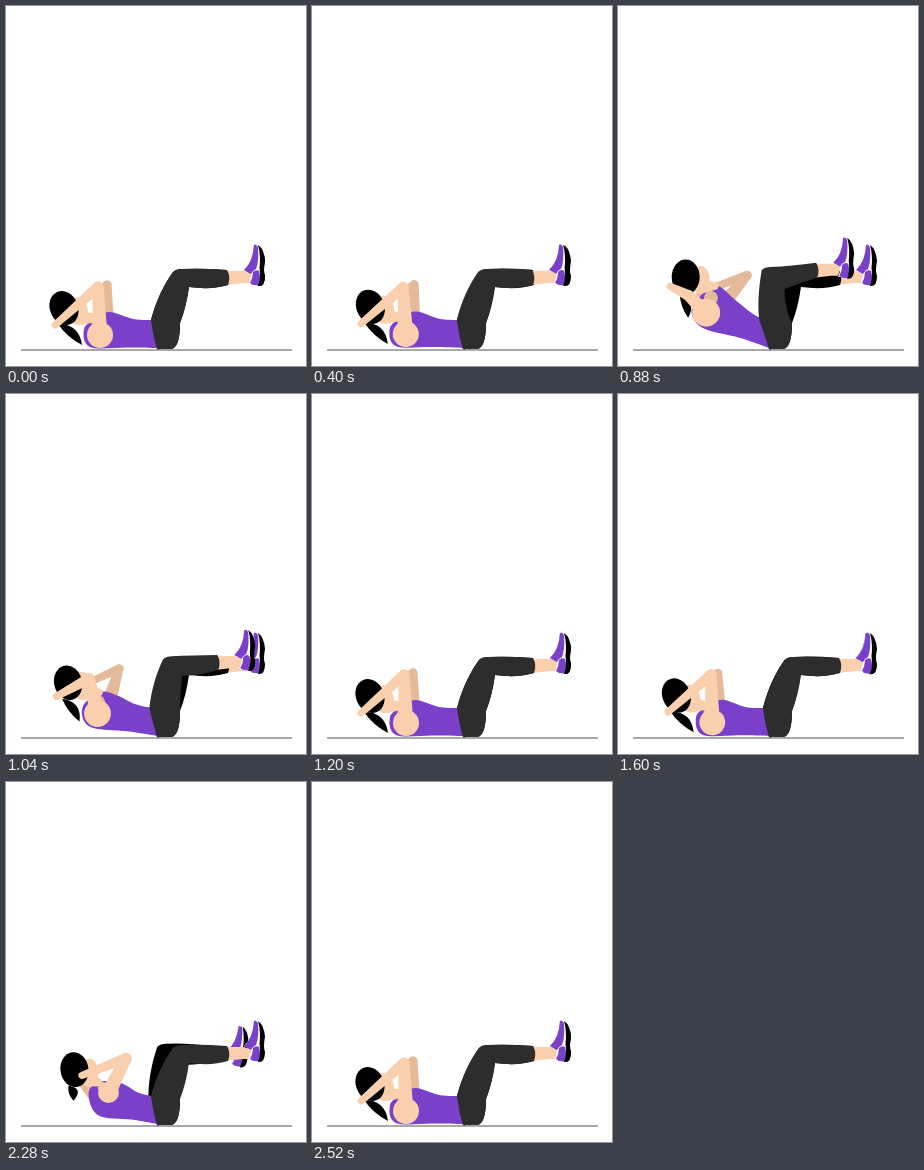
Recreate the animation shown at these times as an HTML page with a canvas. Size 300 by 360 pixels, loop 2.56 s.

```html
<!DOCTYPE html>
<html lang="en">
<head>
<meta charset="utf-8">
<title>Bicycle crunch</title>
<style>
html, body { margin: 0; width: 100%; height: 100%; overflow: hidden; background: #fff; }
canvas { display: block; width: 300px; height: 360px; }
</style>
</head>
<body>
<canvas id="stage"></canvas>
<script>
const W = 300, H = 360, LOOP = 2560, STEP = 40;
const SKIN = '#f9cfae', SHADE = '#e4ba9b', PURPLE = '#7b40c9', DARK = '#2d2d2d', BLACK = '#000';
const canvas = document.getElementById('stage');
const ctx = canvas.getContext('2d');
const dpr = window.devicePixelRatio || 1;
canvas.width = W * dpr;
canvas.height = H * dpr;

// Joints lying flat and at the top of each twist; shape is [shoulder radius, head tilt].
const poses = {
  rest: {
    head: [58, 302], tail: [76, 339], neck: [90, 312], bust: [104, 306], back: [78, 323], low: [84, 341],
    hand: [49, 319], elbow: [92, 281], shoulder: [94, 329],
    farHand: [92, 286], farElbow: [101, 279], farShoulder: [101, 308], shape: [13, -0.4]
  },
  left: {
    head: [68, 270], tail: [70, 311], neck: [97, 279], bust: [117, 293], back: [74, 301], low: [84, 321],
    hand: [52, 279], elbow: [70, 290], shoulder: [88, 306],
    farHand: [81, 287], farElbow: [130, 269], farShoulder: [111, 291], shape: [14, 0]
  },
  right: {
    head: [74, 280], tail: [63, 308], neck: [93, 294], bust: [119, 298], back: [85, 306], low: [96, 329],
    hand: [90, 280], elbow: [135, 274], shoulder: [107, 301],
    farHand: [66, 284], farElbow: [50, 294], farShoulder: [87, 323], shape: [9, 0]
  }
};
const hip = [151, 342], waist = [146, 314];

const shoe = [
  ['#fff', 'M248 239Q253 237 256 245L255 279L243 278Q246 270 245 267L238 264Q247 256 248 239Z'],
  [PURPLE, 'M248 239Q251 238 252 242Q253 256 250 263Q246 265 245 268L238 264Q247 256 248 239Z'],
  [PURPLE, 'M247 266Q250 263 253 265Q255 272 253 279Q247 280 244 277Q247 272 247 266Z'],
  [BLACK, 'M252 239Q258 243 259 255Q257 265 259 270Q259 281 252 280Q255 272 253.5 262Q255 250 252 239Z']
].map(([color, path]) => [color, new Path2D(path)]);
const ankle = new Path2D('M219 265L238 265L245 268L243 277L236 277L219 279Z');

const mix = (a, b, k) => a.map((v, i) => v + (b[i] - v) * k);
const add = (p, x, y) => [p[0] + x, p[1] + y];
const ease = u => (1 - Math.cos(Math.PI * u)) / 2;

function fill(color, path) {
  ctx.fillStyle = color;
  path ? ctx.fill(path) : ctx.fill();
}

function oval([x, y], rx, ry, tilt, color) {
  ctx.beginPath();
  ctx.ellipse(x, y, rx, ry, tilt, 0, 7);
  fill(color);
}

const disc = (p, r, color) => oval(p, r, r, 0, color);

// Tapered limb with round ends.
function limb(a, b, ra, rb, color) {
  const dir = Math.atan2(b[1] - a[1], b[0] - a[0]);
  const side = Math.acos((ra - rb) / Math.max(Math.hypot(b[0] - a[0], b[1] - a[1]), Math.abs(ra - rb)));
  ctx.beginPath();
  ctx.arc(a[0], a[1], ra, dir + side, dir - side + Math.PI * 2);
  ctx.arc(b[0], b[1], rb, dir - side, dir + side);
  fill(color);
}

// Closed smooth curve; a repeated point makes a corner.
function blob(points, color) {
  const n = points.length, at = i => points[(i + n) % n];
  ctx.beginPath();
  ctx.moveTo(...points[0]);
  for (let i = 0; i < n; i++) {
    const [a, b, c, d] = [at(i - 1), at(i), at(i + 1), at(i + 2)];
    ctx.bezierCurveTo(b[0] + (c[0] - a[0]) / 6, b[1] + (c[1] - a[1]) / 6,
      c[0] - (d[0] - b[0]) / 6, c[1] - (d[1] - b[1]) / 6, ...c);
  }
  fill(color);
}

// A raised foot slides back by dx and shifts by dy; the knee bends with it.
function drawLeg(s, color, lift, turn) {
  const dx = -23.5 * s, dy = lift * s, rise = Math.min(dy, 0);
  const [kx, ky] = [170 - 24 * s, 264 - 2 * s];
  const wx = 145 - 4 * s, bend = kx - wx;
  const ax = 222 + dx, ay = 264 + rise;
  ctx.save();
  ctx.translate(dx, rise);
  fill(SKIN, ankle);
  ctx.restore();

  ctx.beginPath();
  ctx.moveTo(151, 343);
  ctx.quadraticCurveTo(147, 330, wx, 314);
  ctx.bezierCurveTo(wx + bend * 0.37 - 4, 294, kx - 3 - bend * 0.35, ky + 14, kx - 3, ky + 2);
  ctx.quadraticCurveTo(kx, ky - 1, kx + 6, ky - 1);
  ctx.quadraticCurveTo((kx + ax) / 2, ky - 2, ax - 1, ay);
  ctx.quadraticCurveTo(ax + 3, ay + 7, ax, ay + 15);
  ctx.quadraticCurveTo(ax - 16, ay + 20, kx + 13 + 7 * s, 281 + 2 * s);
  ctx.quadraticCurveTo(kx + 10 + 10 * s, 302, 174, 317);
  ctx.quadraticCurveTo(174, 342, 165, 343);
  fill(color);

  ctx.save();
  ctx.translate(249 + dx, 239 + dy);
  ctx.rotate(turn * s);
  ctx.translate(-249, -239);
  for (const [tone, path] of shoe) fill(tone, path);
  ctx.restore();
}

function drawTorso(p) {
  const belly = add(mix(p.bust, waist, 0.5), 2, 3);
  const seat = add(mix(p.low, hip, 0.5), 4, 0);
  blob([hip, hip, waist, waist, belly, p.bust, p.neck, p.back, p.low, seat], PURPLE);
}

function drawHead(p, tilt) {
  limb(add(p.head, 14, 10), p.neck, 7, 4, SKIN);
  oval(add(p.head, 15, 3), 9, 14, tilt / 2, SKIN);
  oval(p.head, 14, 17.5, tilt, BLACK);
  const root = add(p.head, -6, 16), [tx, ty] = p.tail;
  const vx = tx - root[0], vy = ty - root[1], len = Math.hypot(vx, vy);
  const control = off => add(mix(root, p.tail, 0.5), vy / len * off, -vx / len * off);
  ctx.beginPath();
  ctx.moveTo(...root);
  ctx.quadraticCurveTo(...control(14), tx, ty);
  ctx.quadraticCurveTo(...control(-4), ...root);
  fill(BLACK);
}

function drawArm(hand, elbow, shoulder, r, color) {
  limb(hand, elbow, 3.5, r, color);
  limb(elbow, shoulder, r, r + 2, color);
}

// Share of the way through a move that advances in whole steps.
function progress(t, start, count) {
  const n = Math.floor((t - start) / STEP) + 1;
  return ease(Math.min(1, Math.max(0, n / count)));
}

function draw(t) {
  const left = progress(t, 400, 8) - progress(t, 880, 9);
  const right = progress(t, 1600, 10) - progress(t, 2160, 10);
  const p = {};
  for (const joint in poses.rest) {
    p[joint] = mix(poses.rest[joint], poses[right > 0 ? 'right' : 'left'][joint], left + right);
  }
  const [shoulderR, tilt] = p.shape;

  ctx.setTransform(dpr, 0, 0, dpr, 0, 0);
  ctx.fillStyle = '#fff';
  ctx.fillRect(0, 0, W, H);
  ctx.fillStyle = '#a8a8a8';
  ctx.fillRect(15, 343, 271, 2);

  drawLeg(right, BLACK, 8, 0.1);
  drawArm(p.farHand, p.farElbow, p.farShoulder, 4.5, SHADE);
  drawTorso(p);
  drawLeg(left, DARK, -7.5, 0);
  disc(mix(p.neck, p.shoulder, 0.45), shoulderR / 2, SHADE);
  drawHead(p, tilt);
  drawArm(p.hand, p.elbow, p.shoulder, 5.5, SKIN);
  disc(p.shoulder, shoulderR, SKIN);
}

const begin = performance.now();
function frame() {
  draw((performance.now() - begin) % LOOP);
  requestAnimationFrame(frame);
}
frame();
</script>
</body>
</html>
```
